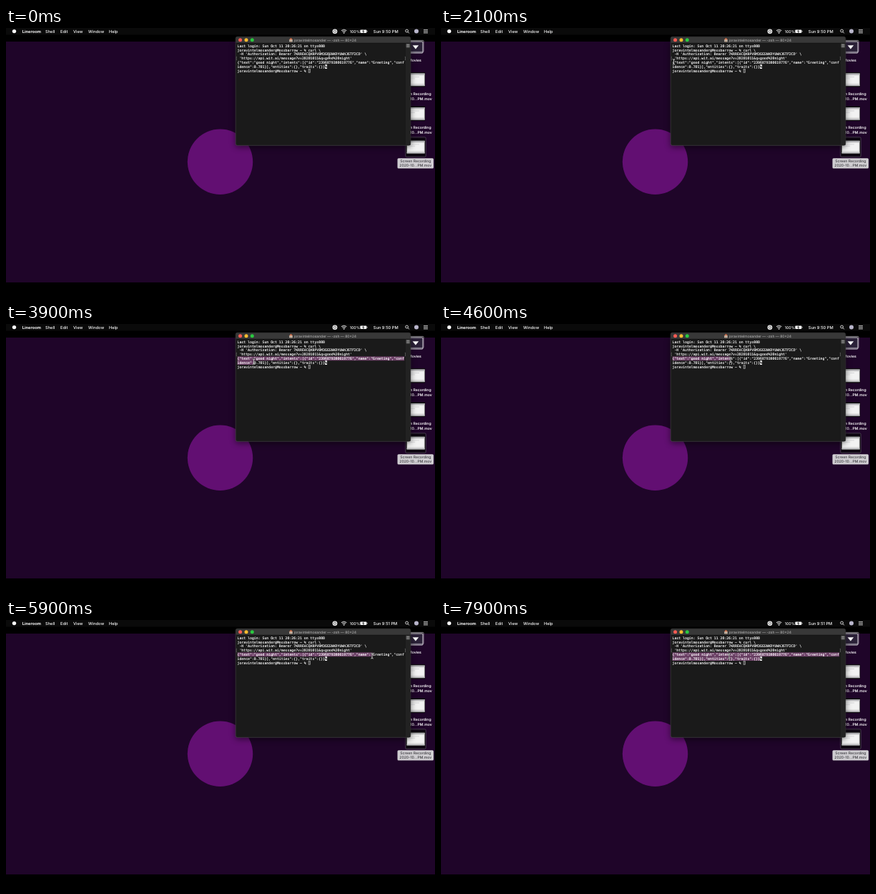
These frames come from a looping animation (600 px wide and 375 px high, 8 s). An HTML page:

```html
<!DOCTYPE html>
<html lang="en">
<head>
<meta charset="utf-8">
<title>Shell session</title>
<style>
html, body { margin: 0; width: 100%; height: 100%; overflow: hidden; background: #000; }
svg { display: block; width: 600px; height: 375px; }
text { white-space: pre; text-rendering: geometricPrecision; }
.ui { font-family: Inter, "Open Sans", sans-serif; fill: #fff; }
.mono { font: 4.85px "DejaVu Sans Mono", "Liberation Mono", monospace; fill: #fff; stroke: #fff; stroke-width: .12px; }
.mid { text-anchor: middle; }
#menu { font-weight: 500; }
#icons { font-weight: 600; }
</style>
</head>
<body>
<svg id="stage" viewBox="0 0 600 375">
  <defs>
    <filter id="shadow" x="-20%" y="-20%" width="140%" height="150%">
      <feGaussianBlur stdDeviation="4"/>
    </filter>
  </defs>
  <rect width="600" height="375" fill="#000"/>
  <rect width="600" height="9.5" fill="#0a0a0a"/>
  <rect y="19" width="600" height="337" fill="#1f0529"/>
  <circle cx="299.5" cy="187.3" r="45.7" fill="#620f72"/>
  <g id="icons"></g>
  <g id="menu"></g>
  <g id="win">
    <rect x="321" y="20" width="245" height="147" rx="3" fill="#000" opacity=".5" filter="url(#shadow)"/>
    <rect x="321.2" y="12.2" width="244.6" height="152.1" rx="2.5" fill="#1a1a1a" stroke="#4a4a4a" stroke-width=".6"/>
    <path d="M321.5 21V15a2.5 2.5 0 0 1 2.5-2.5H563a2.5 2.5 0 0 1 2.5 2.5V21Z" fill="#383838"/>
    <rect x="321.5" y="20.8" width="244" height=".5" fill="#0c0c0c"/>
    <rect x="558.8" y="21.3" width="6.7" height="142.5" fill="#222"/>
    <rect x="559.6" y="22" width="5.2" height="5.6" rx=".8" fill="#606060"/>
    <path d="M560.8 23.6h2.8M560.8 25.8h2.8" stroke="#aaa" stroke-width=".5"/>
    <circle cx="327.6" cy="16.7" r="2.5" fill="#fc5b53"/>
    <circle cx="336" cy="16.7" r="2.5" fill="#fdbc2e"/>
    <circle cx="344.3" cy="16.7" r="2.5" fill="#2ac840"/>
    <path d="M395.7 16.6L398.5 13.8L401.3 16.6Z" fill="#d9734a"/>
    <path d="M396.5 16.4h4v3h-4Z" fill="#e9dfd0"/>
    <rect x="397.9" y="17.4" width="1.2" height="2" fill="#8a5a3c"/>
  </g>
  <g id="sel" fill="#6f4369"><rect/><rect/></g>
  <g id="lines"></g>
  <g id="beam" fill="none" stroke-linecap="round">
    <path d="M-1.3-3.4Q0-3.4 0-2.4V3Q0 4-1.3 4M1.3-3.4Q0-3.4 0-2.4M0 3Q0 4 1.3 4" stroke="#222" stroke-width="1.5"/>
    <path d="M-1.3-3.4Q0-3.4 0-2.4V3Q0 4-1.3 4M1.3-3.4Q0-3.4 0-2.4M0 3Q0 4 1.3 4" stroke="#fff" stroke-width=".7"/>
  </g>
</svg>
<script>
const LOOP = 8000, LEFT = 323.5, CHAR = 2.92, TOP = 22.2, ROW = 5.8;
const DRAG_START = 2300, DRAG_END = 6900, CLOCK_TICK = 4900;
const $ = id => document.getElementById(id);

function add(parent, tag, attrs, text) {
  const el = document.createElementNS("http://www.w3.org/2000/svg", tag);
  for (const k in attrs) el.setAttribute(k, attrs[k]);
  if (text !== undefined) el.textContent = text;
  $(parent).appendChild(el);
  return el;
}
const label = (parent, x, y, size, text, extra) =>
  add(parent, "text", { class: "ui", x, y, "font-size": size, ...extra }, text);
const box = (parent, x, y, width, height, fill, extra) =>
  add(parent, "rect", { x, y, width, height, fill, ...extra });
const line = (parent, d, stroke, width, extra) =>
  add(parent, "path", { d, stroke, "stroke-width": width, fill: "none", ...extra });
const disc = (parent, cx, cy, r, fill, extra) => add(parent, "circle", { cx, cy, r, fill, ...extra });

// Menu bar
disc("menu", 11.5, 4.6, 2.7, "#fff");
label("menu", 22.8, 6.8, 5.7, "Lineroom", { "font-weight": 700 });
[["Shell", 55], ["Edit", 76], ["View", 94], ["Window", 115], ["Help", 144]]
  .forEach(([name, x]) => label("menu", x, 6.8, 5.7, name));
disc("menu", 460, 4.7, 3.3, "#fff");
box("menu", 458.5, 3.2, 3, 3, "#fff", { stroke: "#111", "stroke-width": .6, rx: .5 });
line("menu", "M469 3.6Q472.7.6 476.4 3.6M470.3 5.1Q472.7 3.2 475.1 5.1M471.6 6.5Q472.7 5.6 473.8 6.5", "#fff", .9);
disc("menu", 472.7, 7.2, .6, "#fff");
label("menu", 480.8, 6.7, 5.2, "100%");
box("menu", 495.4, 2.4, 8.9, 4.5, "#fff", { rx: .9 });
box("menu", 504.7, 3.8, .7, 1.8, "#fff");
line("menu", "M500.4 2.6L498.7 4.9H500.8L499.5 6.8", "#000", .8);
const clock = label("menu", 513.8, 6.8, 5.7, "");
disc("menu", 560.6, 4, 1.9, "none", { stroke: "#fff", "stroke-width": .8 });
line("menu", "M562 5.4L563.8 7.3", "#fff", .9);
disc("menu", 574, 4.6, 3, "#b9b6cc");
line("menu", "M584 2.6H590M584 4.7H590M584 6.8H590", "#fff", .8);

// Desktop icons
box("icons", 562.5, 19, 20.5, 16, "#2b2138", { stroke: "#d8d4dc", "stroke-width": 1, rx: 1 });
box("icons", 564.5, 17.4, 19.5, 16, "none", { stroke: "#bdb8c4", "stroke-width": .7, rx: 1 });
add("icons", "path", { d: "M568.6 24.2H577.2L572.9 29.6Z", fill: "#fff" });
label("icons", 572, 47.4, 5.1, "Movies", { class: "ui mid" });

function recording(top, labelTop, picked) {
  if (picked) {
    box("icons", 558.8, top - 5, 28.4, 27.6, "#0d0511", { stroke: "#77717d", "stroke-width": .5, rx: 1.5 });
    box("icons", 547.5, labelTop - 5.4, 50.5, 14.4, "#cfcdd1", { rx: 1.6 });
  }
  box("icons", 560, top - 1.4, 26.2, 20.4, "#0b0b0b");
  box("icons", 560.6, top, 25, 17.6, "#dcdcdc");
  box("icons", 560.6, top, 25, 1.8, "#a9a9ad");
  box("icons", 561.5, top + 3.2, 23, 11, "#f2f2f2");
  line("icons", `M563 ${top + 5}h15M563 ${top + 7.4}h9`, "#c4c4c8", .6);
  box("icons", 560.6, top + 16.2, 25, 1.4, "#b5b5b9");
  const style = { class: "ui mid", style: picked ? "fill:#3a3a3e;font-weight:500" : "" };
  label("icons", 572.8, labelTop, 5.1, "Screen Recording", style);
  label("icons", 572.8, labelTop + 6.3, 5.1, "2020-10...PM.mov", style);
}
recording(63.5, 94.4, false);
recording(111, 141.4, false);
recording(157.8, 187.6, true);

// Shell window
const user = "joravintelmosander", prompt = user + "@Mossbarrow ~ % ";
label("win", 446.4, 18.6, 5, user + " — -zsh — 80×24", { class: "ui mid", style: "fill:#bcbcbc" });
const rows = [
  "Last login: Sun Oct 11 20:26:21 on ttys000",
  prompt + "curl \\",
  " -H 'Authorization: Bearer 7KRRE4CQXBPV8M3GGSNKDYUWHJ6TF2CD' \\",
  " 'https://api.wit.ai/message?v=20201011&q=good%20night'",
  '{"text":"good night","intents":[{"id":"2396879380619776","name":"Greeting","conf',
  'idence":0.701}],"entities":{},"traits":{}}',
  prompt
];
const colX = c => LEFT + c * CHAR;
const rowY = r => TOP + r * ROW;
const END = rows[5].length;
rows.forEach((s, r) => add("lines", "text", { class: "mono", x: LEFT, y: rowY(r) + 4.5 }, s));
box("lines", colX(END), rowY(5), CHAR, ROW, "#fff");
add("lines", "text", { class: "mono", x: colX(END), y: rowY(5) + 4.5, style: "fill:#111;stroke:#111" }, "%");
box("lines", colX(34) + .3, rowY(6) + .3, CHAR - .3, ROW - .6, "#4c4c4c", { stroke: "#b0b0b0", "stroke-width": .6 });
line("lines", "M322.9 40.3H322.2V44.8H322.9M557.8 40.3H558.5V44.8H557.8", "#8a8a8a", .5);

// Pointer: time, x, y
const path = [
  [0, 452, 39], [900, 417, 40], [1500, 376, 44], [2100, 325.6, 47], [2400, 324, 47.5],
  [3100, 327, 51.6], [3900, 346.6, 52.5], [4500, 402, 50], [5200, 454.8, 51],
  [5900, 512, 50], [6400, 470, 52.4], [6800, 446.5, 53], [7000, 446.5, 53],
  [7900, 403, 50.3], [8000, 402, 50]
];
function pointer(t) {
  const i = Math.max(1, path.findIndex(p => p[0] >= t));
  const [t0, x0, y0] = path[i - 1], [t1, x1, y1] = path[i];
  const u = (t - t0) / (t1 - t0), k = u * u * (3 - 2 * u);
  return [x0 + (x1 - x0) * k, y0 + (y1 - y0) * k];
}

const [first, second] = $("sel").children;
function span(el, row, cols) {
  el.setAttribute("x", LEFT);
  el.setAttribute("y", rowY(row));
  el.setAttribute("width", Math.max(0, cols) * CHAR);
  el.setAttribute("height", ROW);
}
function select(t) {
  if (t < DRAG_START) return [0, 0];
  const [x, y] = pointer(Math.min(t, DRAG_END));
  const col = Math.round((x - LEFT) / CHAR);
  return y < rowY(5) ? [Math.min(80, col), 0] : [80, Math.min(END, col)];
}

function draw(now) {
  const t = now % LOOP;
  const [x, y] = pointer(t), [a, b] = select(t);
  $("beam").setAttribute("transform", `translate(${x} ${y})`);
  span(first, 4, a);
  span(second, 5, b);
  clock.textContent = t < CLOCK_TICK ? "Sun 9:50 PM" : "Sun 9:51 PM";
}
const start = performance.now();
function tick() {
  draw(performance.now() - start);
  requestAnimationFrame(tick);
}
tick();
</script>
</body>
</html>
```
